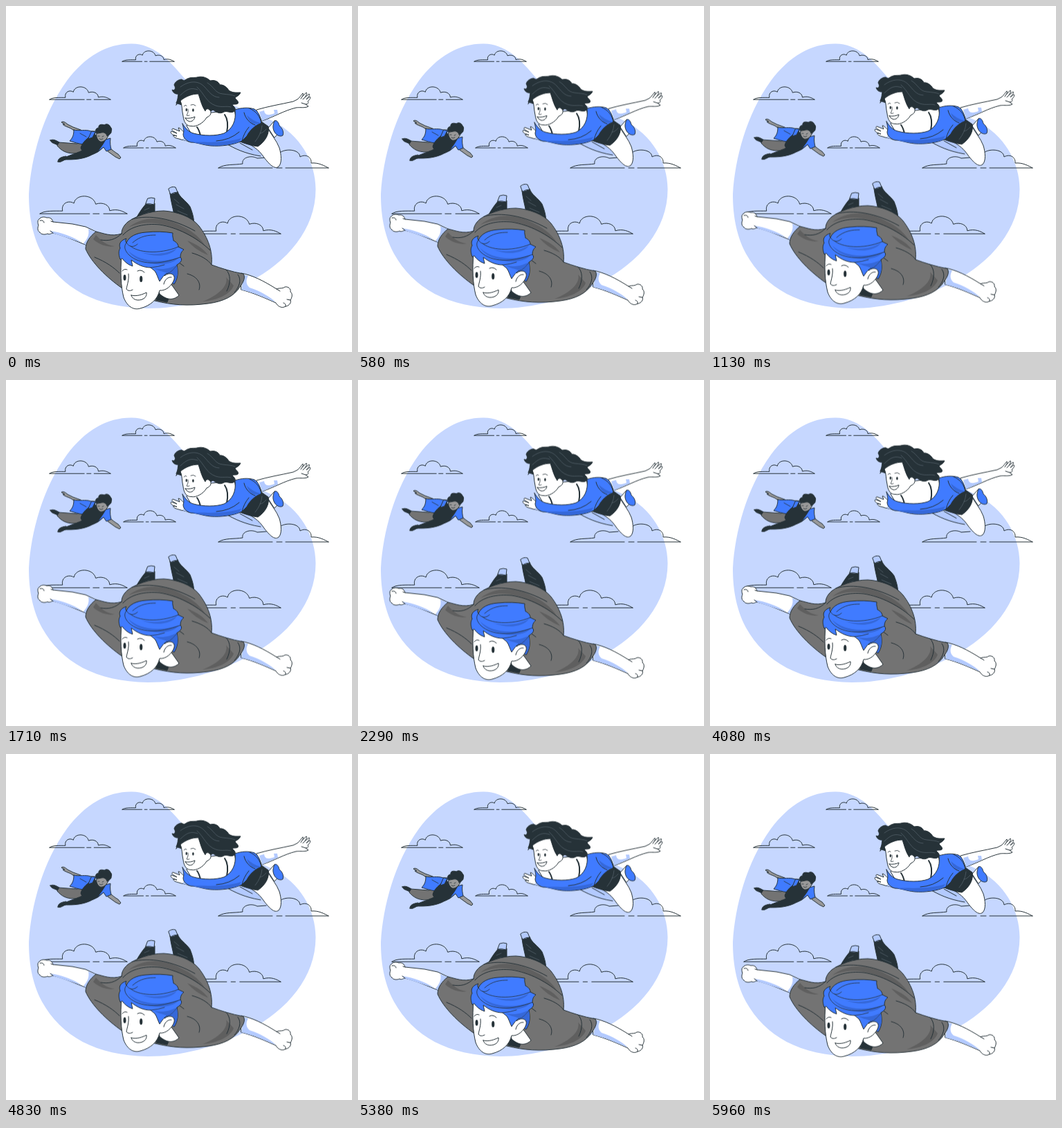
An HTML page for the animation above (6 s loop, 500x500 px).

```html
<!DOCTYPE html>
<html lang="en">
<head>
<meta charset="utf-8">
<title>Flying people</title>
<style>
  html, body { margin: 0; width: 100%; height: 100%; overflow: hidden; background: #fff; }
  svg { display: block; width: 100%; height: 100%; }
  path, ellipse { stroke-linecap: round; stroke-linejoin: round; }
  .line { fill: none; stroke: #263238; stroke-width: 1; }
  .line .white { fill: #fff; }
  .line .blue { fill: #407bff; }
  .line .grey { fill: #737373; }
  .line .skin { fill: #999; }
  .line .dark { fill: #263238; }
  .line .shade { fill: #b3caff; stroke: none; }
  .line .deep { fill: #3568d9; stroke: none; }
  .line .fold { fill: #5f5f5f; stroke: none; }
  .line .dot { fill: #263238; stroke: none; }
  .line .sheen { stroke: #62707a; stroke-width: .6; }
  .cloud { vector-effect: non-scaling-stroke; }
  .float { animation: float 6s linear infinite; }
  .quick { animation-duration: 3s; }
  .slow { animation-name: drift; }
  @keyframes float { 50% { transform: translateY(-10px); } }
  /* a seven second bob, cut off at six seconds */
  @keyframes drift {
    0% { transform: translateY(0); }
    58.333% { transform: translateY(-10px); }
    100% { transform: translateY(-2.857px); }
  }
</style>
</head>
<body>
<svg viewBox="0 0 500 500">
  <defs>
    <path id="puff" class="cloud" d="M0 20C5 16 17 17 26 16.8C24 8 33 4 39 8C41 -3 61 -3 64 9C72 6 80 10 80 16.5C89 14 95 17 100 20"/>
    <g id="cloud"><use href="#puff"/><path class="cloud" d="M0 20H57M61 20H68M73 20H100"/></g>
    <g id="cloud2"><use href="#puff"/><path class="cloud" d="M0 20H38M43 20H48M53 20H100"/></g>
  </defs>

  <path fill="#c6d7ff" d="M182 54.5C212 55 234 76 253 99C285 138 338 142 385 166C425 186 447.500 225 447.500 265C447.500 322 407 370 351 399C304 424 252 437 205 437C130 436 80 408 52 358C36 328 33 296 33 272C36 220 53 156 88 108C115 72 147 54 182 54.5Z"/>

  <g class="line">
    <use href="#cloud2" transform="translate(168 65) scale(.75 .76)"/>
    <use href="#cloud" transform="translate(63 117) scale(.88 .91)"/>
    <use href="#cloud2" transform="translate(170 189) scale(.75 .8)"/>
    <use href="#cloud" transform="translate(49 275) scale(1.26)"/>
    <use href="#cloud2" transform="translate(271 304) scale(1.26)"/>
    <path d="M307 234C316 228 330 230 342 228C340 219 354 215 363 220L376 219M396 212C402 206 424 206 425 218C434 213 442 219 441 227C452 226 460 231 466 234M307 234H385M391 234H399M404 234H466"/>
  </g>

  <!-- distant man -->
  <g class="float line">
    <path class="skin" d="M108 179L97 175L89 171C86 168 82 166 80 168L85 171L82 171C85 174 90 175 94 177L104 184Z"/>
    <path class="grey" d="M120 195L102 199L76 197L74 202C80 209 87 213 98 213L114 211L126 205Z"/>
    <path class="dark" d="M64 194C68 192 72 194 77 197L74 201C70 198 66 199 64 194Z"/>
    <path class="dark" d="M112 208C104 212 97 214 87 218L85 222C98 222 112 222 126 214Z"/>
    <path class="dark" d="M75 225C75 220 80 218 87 217L86 222C82 223 79 227 75 225Z"/>
    <path class="blue" d="M98 179C106 181 115 178 123 181L131 181L124 191L112 200C104 199 99 197 92 195C97 190 98 185 98 179Z"/>
    <path class="dark" d="M127 185C118 190 110 197 108 205C110 212 118 216 126 214C135 211 142 204 146 194L135 190Z"/>
    <path class="skin" d="M148 204C154 208 158 212 162 214L166 219L164 221L158 218L147 210Z"/>
    <path class="blue" d="M144 193L151 191C150 198 151 203 152 207L145 210L141 204L132 211C137 204 141 199 144 193Z"/>
    <path class="blue" d="M124 181L129 182L125 190L119 192Z"/>
    <path class="skin" d="M132 181C129 186 131 193 136 196C141 197 146 193 149 185L143 179Z"/>
    <path class="dark" d="M131 184C128 180 130 176 134 176C133 170 140 171 142 172C146 169 150 172 151 175C154 178 152 180 152 183C150 186 148 187 146 188C145 184 142 182 138 183Z"/>
    <path d="M133 188L135 188M139 189L141 188M135 192Q137 194 140 192M107 184L116 189" stroke-width=".8"/>
  </g>

  <!-- man in front -->
  <g class="float quick line">
    <path class="dark" d="M203 285L215 285L215 296L216 306L184 314C190 303 195 294 203 285Z"/>
    <path class="shade" d="M205 278L215 277L214 287L202 286Z"/>
    <path d="M205 278Q210 276 215 278L214 287Q208 285 202 286Z"/>
    <path class="dark" d="M237 271L248 268C251 277 260 281 266 290C270 300 273 311 271 320L243 302C241 291 238 281 237 271Z"/>
    <path class="shade" d="M235 264L245 261L248 269L238 272Z"/>
    <path d="M235 264Q240 260 245 262L248 269Q242 269 238 272Z"/>
    <path class="sheen" d="M200 295L207 292M196 302L207 298M243 279L250 285M246 287L257 293M248 296L262 302"/>

    <path class="white" d="M132 327L115 319L96 315L68 312C67 308 64 305 59 306C55 304 50 305 48 308C45 309 46 315 47 317C45 321 46 326 49 327C50 330 56 331 60 329C63 331 66 328 68 328C84 332 100 339 117 346Z"/>
    <path class="shade" d="M119 322L131 327L116 346L112 343C117 337 121 331 119 322ZM67 328L64 325C80 327 96 333 110 342Z"/>
    <path d="M49 310Q55 309 55 313M68 312L65 311M64 325L68 328"/>

    <path class="white" d="M340 386C356 389 372 397 391 409C395 407 399 409 403 406C408 405 412 409 411 413C415 416 413 422 411 425C413 430 407 434 404 434C398 438 392 433 390 429C374 422 359 415 340 410Z"/>
    <path class="shade" d="M344 388L350 390C346 396 347 403 352 407C368 412 381 420 390 428C374 422 358 414 340 410Z"/>
    <path d="M391 409L396 412M411 425L406 424M404 434Q405 430 401 429"/>

    <path class="grey" d="M167 329C152 334 140 328 130 326C121 333 115 342 115 351C123 370 145 392 168 408L215 426C240 432 262 434 292 430C315 427 330 419 338 406C344 398 346 392 343 387C326 384 311 379 297 374C299 354 292 335 279 318C268 304 246 297 228 296C207 296 187 304 176 312C168 319 167 325 167 329Z"/>
    <path class="fold" d="M177 320C196 304 226 303 252 317C267 324 277 331 287 345C266 332 250 322 231 317C211 311 192 313 177 320ZM262 339C275 344 286 351 292 360C278 354 270 348 262 339ZM130 331C139 341 147 346 157 347C145 350 131 342 126 337ZM318 392C322 404 306 419 284 427C306 425 324 417 329 404Z"/>
    <path d="M169 331C180 318 201 314 222 316C247 320 274 333 295 353M182 308C207 301 241 307 273 325M297 374C292 366 280 360 269 357M167 329C158 338 148 340 137 338M318 381C325 388 325 400 319 412M262 387C278 391 282 402 279 410M128 363C145 370 156 378 164 386M257 376L249 370M335 388C341 396 337 406 330 414"/>

    <path class="dark" d="M222 412L236 420L233 428L217 425Z"/>
    <path class="white" d="M236 398L250 418C243 425 233 426 222 416L220 408Z"/>
    <path class="blue" d="M214 372L247 374C249 384 249 393 243 402L236 398Z"/>
    <path class="deep" d="M226 376L247 376C249 385 248 393 243 401L238 398Z"/>
    <path class="white" d="M167 360C165 385 166 405 170 421C175 434 184 440 194 437C209 433 219 424 222 411C231 412 240 404 243 395C245 387 236 384 229 390L214 362Z"/>
    <path d="M228 402C229 396 234 391 239 392"/>
    <path class="blue" d="M165 366C162 358 163 353 165 350C162 343 167 338 174 336C172 339 173 341 174 342C178 333 188 328 202 327C216 325.500 229 326 241 328C240 333 242 336 242 339C246 341 249 344 249 348L257 352C253 355 252 359 252 363C256 367 252 371 247 374C242 381 238 385 233 386C229 388 226 392 222 398C219 392 218 387 215 383L209 378C199 378 190 374 181 367L183 376C176 374 171 369 168 365Z"/>
    <path class="deep" d="M177 354C192 368 219 373 250 363C241 375 217 375 203 370C190 367 181 361 177 354ZM196 356C217 361 235 357 247 350C239 362 214 364 196 356ZM214 379C228 382 239 378 247 374C242 381 238 385 233 386C226 383 220 383 214 379Z"/>
    <path d="M174 342C178 349 185 349 190 344M174 342C170 347 171 353 178 360C194 374 220 375 252 363M180 347C190 356 220 360 249 348M183 342C194 332 206 331 216 331M209 378Q220 377 229 374" stroke-width=".8"/>

    <ellipse class="dot" cx="171.500" cy="392.500" rx="2" ry="4.300"/>
    <ellipse class="dot" cx="195.200" cy="394.500" rx="2.100" ry="4.500"/>
    <path d="M168 383Q171 379 175 381M190 383Q195 380 200 385"/>
    <path d="M177 387C178 396 175 403 174 409C176 412 180 412 183 410"/>
    <path class="white" d="M181 418C189 420 197 417 203 414C204 421 198 425 191 425C186 425 182 422 181 418Z"/>
  </g>

  <!-- woman -->
  <g class="float slow line">
    <path class="white" d="M362 150C379 145 397 142 415 138L421 135C425 132 426 129 429 126C430 127 429 130 428 131L434 125C436 126 433 130 432 132L438 127C440 129 436 132 434 135L439 131C441 132 439 135 436 138C438 140 436 142 433 142L437 145C432 148 425 146 419 147C402 151 388 160 370 166Z"/>
    <path class="shade" d="M366 153L373 151C374 159 381 158 388 155L387 150L392 150L393 156L370 166Z"/>
    <path d="M428 131L426 134M432 132L429 135M433 142L427 140"/>

    <path class="shade" d="M318 199C331 206 344 213 368 217L378 213L361 197Z"/>
    <path d="M318 199C331 206 344 213 368 217M338 198L356 208"/>
    <path class="white" d="M379 176L387 167L395 183L388 190Z"/>
    <path class="blue" d="M388 166C392 164 394 169 395 173C399 176 402 182 400 187C396 190 389 186 387 180C385 175 386 171 388 166Z"/>
    <path class="white" d="M378 176C383 186 391 194 395 205C398 215 399 227 394 232C388 237 380 228 373 219C367 210 361 205 352 200Z"/>
    <path class="dark" d="M344 183L369 167L379 174C381 183 376 195 364 203C355 202 346 199 338 196Z"/>
    <path class="sheen" d="M370 173Q369 185 360 196M376 178Q371 184 367 184"/>

    <path class="white" d="M266 186L258 183C254 180 252 176 249 176L251 181L241 177C239 178 240 180 242 181L247 184L239 181C237 182 239 185 241 186L247 188L242 187C241 189 245 191 250 192C254 194 258 193 264 196Z"/>
    <path class="shade" d="M258 183L266 187L264 196L255 193Q259 189 258 183Z"/>

    <path class="white" d="M289 154C301 155 313 151 330 150L335 176L304 190L268 185L261 173Z"/>
    <path d="M316 157C321 164 321 173 319 183M276 175C279 179 280 183 281 187" stroke-width="2"/>
    <path class="blue" d="M255 170C259 177 264 182 271 184C286 188 303 188 315 184C327 178 333 166 331 150C340 147 350 146 359 149C365 153 368 160 369 169C359 173 352 180 348 188L341 195C328 201 311 203 296 202C284 201 276 197 267 197C261 195 256 191 256 185C258 180 256 175 255 170Z"/>
    <path class="deep" d="M270 197C285 195 308 200 340 191L336 197C313 204 288 202 270 197ZM348 158C354 163 360 167 368 169C358 173 352 169 348 158Z"/>
    <path d="M352 148C363 153 367 160 369 169M344 154C346 163 353 170 360 172M341 195C343 187 346 181 351 175M304 195Q323 194 337 182"/>

    <path class="dark" d="M246 140C249 134 248 130 249 127C245 128 241 125 240 121C244 123 246 119 243 114C244 110 249 106 254 106C255 107 257 108 259 107C265 102 272 104 276 103C283 101 290 103 295 108C302 106 308 110 309 114C314 113 320 118 322 122C328 126 334 125 339 125C337 130 332 131 331 133C333 136 337 138 335 141C332 143 329 141 327 143C330 146 333 148 330 152C325 156 320 151 315 153C309 157 303 153 299 150L290 156L254 143Z"/>
    <path class="white" d="M252 137C255 143 254 151 256 159C257 168 261 174 268 173.500C274 175 285 170 290 161C296 159 298 153 294 150C291 147 288 150 288 152C283 145 281 136 278 127C270 127 260 130 252 137Z"/>
    <path class="dark" d="M246 143C251 136 253 130 262 127C268 124 274 122 280 126C282 134 284 141 288 147C292 144 296 147 298 150L304 142L289 118L259 118Z"/>
    <path class="sheen" d="M252 117C264 108 278 107 287 117C293 123 298 132 308 132M291 111C301 117 302 126 313 127C321 128 326 128 331 130M276 117C287 127 289 139 303 144C312 147 319 144 325 146M252 129C262 119 268 118 277 121"/>

    <ellipse class="dot" cx="260.700" cy="150" rx="1.200" ry="2.200"/>
    <ellipse class="dot" cx="270.400" cy="150.500" rx="1.300" ry="2.300"/>
    <path d="M257 145Q259 142 261 144M267 143Q271 141 274 144M263 149C264 153 262 156 261 158Q263 159 265 158" stroke-width=".8"/>
    <path class="white" d="M259 162Q267 163 273 160C272 165 269 167 265 167Q261 166 259 162Z"/>
  </g>
</svg>
</body>
</html>
```
